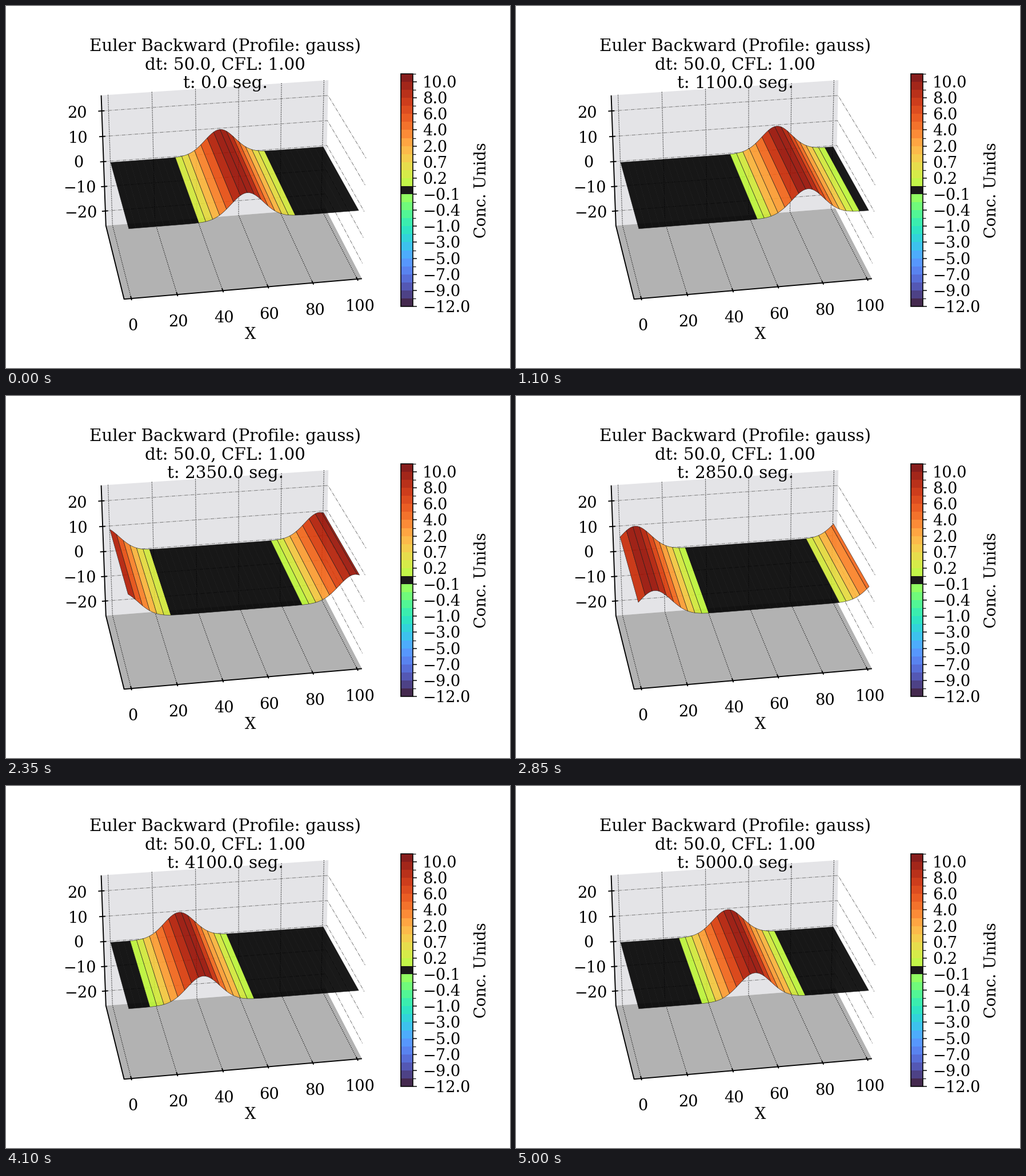
Animation, 882 px wide and 635 px high, one loop 5050 ms. Source, as a matplotlib script:

```python
import numpy as np
import matplotlib
import matplotlib.pyplot as plt
from matplotlib.animation import FuncAnimation
from matplotlib.collections import PolyCollection
from matplotlib.patches import Polygon, Rectangle

W, H, DPI = 882, 635, 100
PT = 72 / DPI                      # points per pixel
N, STRIDE, DT = 101, 3, 50
ALPHA = 0.9

plt.rcParams["font.family"] = "DejaVu Serif"

# Box limits, including the margin around the data
X0, X1 = -3.1, 102.1
Y0, Y1 = -1 / 48, 49 / 48
Z0, Z1 = -26.04, 26.04

# Anchor points of the view: x, y, z -> pixel column, row
ANCHORS = np.array([
    (0, 1, 0, 182.7, 274.2),
    (100, 1, 0, 555, 247.4),
    (100, 0, 0, 617, 359),
    (0, 0, 0, 214.2, 389.8),
    (0, Y0, Z0, 219, 512.5),
    (40, Y0, Z0, 379, 499),
    (60, Y0, Z0, 458, 492.2),
    (100, Y0, Z0, 614.5, 478.8),
    (0, Y1, Z1, 178.5, 154.8),
    (40, Y1, Z1, 331, 144.8),
    (100, Y1, Z1, 556, 130.2),
    (0, Y1, Z0, 186, 383.2),
    (100, Y1, Z0, 550.5, 354.2),
    (X0, Y1, 20, 167, 184.2),
    (X0, Y1, 0, 170, 273),
    (X0, Y1, -20, 173, 359.6),
    (X1, Y0, 20, 629.2, 266),
    (X1, Y0, 0, 626, 360),
    (X1, Y0, -20, 623.3, 450.5),
])
SCALE = np.array([100, 1, 26])


def fit_camera(rows):
    """Least-squares perspective matrix through the anchor points."""
    a, b = [], []
    for x, y, z, u, v in rows:
        p = [*(np.array([x, y, z]) / SCALE), 1]
        u, v = u / 500, v / 500
        a.append(p + [0] * 4 + [-u * c for c in p[:3]])
        a.append([0] * 4 + p + [-v * c for c in p[:3]])
        b += [u, v]
    m = np.linalg.lstsq(np.array(a), np.array(b), rcond=None)[0]
    return np.append(m, 1).reshape(3, 4)


CAMERA = fit_camera(ANCHORS)


def project(x, y, z):
    """Stage coordinates, measured at pixel centres."""
    x, y, z = np.broadcast_arrays(x, y, z)
    p = np.stack([x / SCALE[0], y / SCALE[1], z / SCALE[2], np.ones(x.shape)])
    u, v, w = np.tensordot(CAMERA, p, 1)
    return np.stack([u / w, v / w], -1) * 500 + 0.5


fig = plt.figure(figsize=(W / 100, H / 100), dpi=DPI, facecolor="white")
ax = fig.add_axes([0, 0, 1, 1])
ax.set_xlim(0, W)
ax.set_ylim(H, 0)
ax.axis("off")


def line(points, width, color="black", style="-", z=2):
    points = np.asarray(points)
    ax.plot(points[:, 0], points[:, 1], color=color, lw=width * PT, ls=style,
            zorder=z, solid_capstyle="butt")


def path3d(points, *args, **kw):
    line([project(*p) for p in points], *args, **kw)


def label(x, y, text, size=27.2, ha="center"):
    """Text whose capitals or digits are centred on row y."""
    return ax.text(x, y + 0.365 * size, text, fontsize=size * PT, ha=ha,
                   va="baseline", zorder=8)


def number(v, digits=0):
    return f"{v:.{digits}f}".replace("-", "\u2212")


def pane(points, color):
    ax.add_patch(Polygon([project(*p) for p in points], facecolor=color,
                         edgecolor="none", zorder=1))


# Panes
pane([(X0, Y1, Z0), (X1, Y1, Z0), (X1, Y1, Z1), (X0, Y1, Z1)], "#e4e4e7")
pane([(X0, Y0, Z0), (X1, Y0, Z0), (X1, Y1, Z0), (X0, Y1, Z0)], "#b2b2b2")

# Grid, ticks and tick labels
for k, x in enumerate(range(0, 101, 20)):
    path3d([(x, Y1, Z1), (x, Y1, Z0), (x, Y0, Z0)], 1.2, style=":")
    path3d([(x, Y0 + 0.03, Z0), (x, Y0 - 0.022, Z0)], 1.9, z=3)
    label(222 + 79.6 * k, 559 - 6.8 * k, number(x))
for k, z in enumerate(range(20, -21, -10)):
    path3d([(X0, Y1, z), (X1, Y1, z), (X1, Y0, z)], 1.05, "#808080", "-.")
    path3d([(X0 - 1.6, Y1, z), (X0 + 1.2, Y1, z)], 1.9, z=3)
    label(124.1 + 1.6 * k, 186 + 43.7 * k, number(z))

# Axis lines
path3d([(X0, Y1, Z1), (X0, Y1, Z0), (X0, Y0, Z0), (X1, Y0, Z0)], 1.9, z=3)
label(427.5, 574, "X")

# Colour levels
STEPS = [0.1, 0.2, 0.5, 0.7, 1, 2, 3, 4, 5, 6, 7, 8, 9, 10, 12]
LEVELS = np.array([-v for v in reversed(STEPS)] + STEPS)
LEVELS[[12, 13]] = -0.4, -0.2
BANDS = len(LEVELS) - 1
colors = matplotlib.colormaps["turbo"](np.linspace(0, 1, BANDS))
colors[BANDS // 2, :3] = 0
colors[:, 3] = ALPHA

# Colour bar
LEFT, RIGHT, TOP, BOTTOM = 691, 712, 119, 527
STEP = (BOTTOM - TOP) / BANDS
for k, c in enumerate(colors):
    ax.add_patch(Rectangle((LEFT, BOTTOM - (k + 1) * STEP), RIGHT - LEFT, STEP,
                           facecolor=c, edgecolor="none", zorder=2))
for k, v in enumerate(LEVELS):
    y = BOTTOM - k * STEP
    major = k % 2 == 0
    line([(RIGHT, y), (RIGHT + (7 if major else 4.5), y)],
         1.5 if major else 1.2, z=4)
    if major:
        label(729, y, number(v, 1), ha="left")
ax.add_patch(Rectangle((LEFT, TOP), RIGHT - LEFT, BOTTOM - TOP, fill=False,
                       edgecolor="black", lw=1.6 * PT, zorder=4))
ax.text(832, 323, "Conc. Unids", fontsize=27.2 * PT, rotation=90,
        ha="center", va="center", zorder=8)

title = ax.text(383.6, 144, "", fontsize=29.4 * PT, ha="center",
                va="baseline", zorder=8)

# Travelling profile
xs = np.arange(N)
profile = 10 * np.exp(-((xs - 51) / 10) ** 2)
cuts = list(range(0, N - 1, STRIDE)) + [N - 1]
strips = [slice(a, b + 1) for a, b in zip(cuts, cuts[1:])]
surface = PolyCollection([], edgecolors=(0.1, 0.1, 0.1, ALPHA),
                         linewidths=0.6 * PT, zorder=5)
ax.add_collection(surface, autolim=False)


def draw(i):
    z = np.roll(profile, i)
    back, front = project(xs, 1, z), project(xs, 0, z)
    surface.set_verts([np.vstack([back[s], front[s][::-1]]) for s in strips])
    means = [z[s].mean() for s in strips]
    surface.set_facecolor(colors[np.searchsorted(LEVELS, means, "right") - 1])
    title.set_text("Euler Backward (Profile: gauss)\n"
                   f"dt: {DT:.1f}, CFL: 1.00\n"
                   f"t: {i * DT:.1f} seg.")
    return surface, title


anim = FuncAnimation(fig, draw, frames=N, interval=50,
                     init_func=lambda: draw(0), repeat=True)
plt.show()
```
